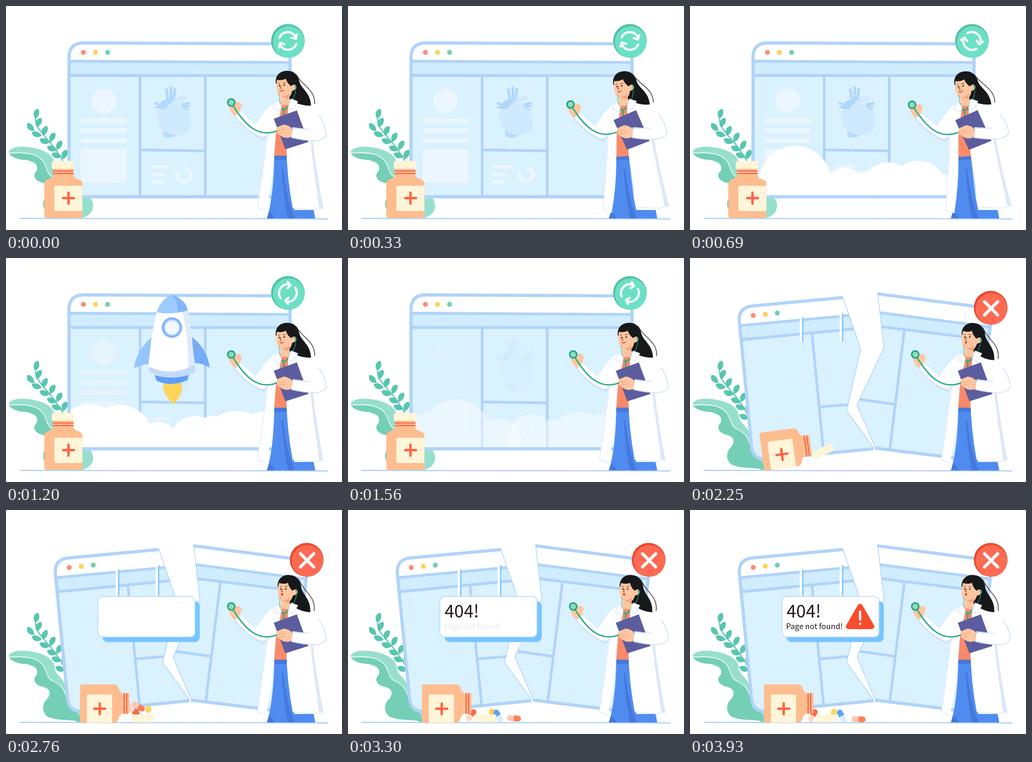
An HTML page for the animation above (4500 ms loop, 640 by 425 pixels).

```html
<!DOCTYPE html>
<html lang="en">
<head>
<meta charset="utf-8">
<title>Page not found</title>
<style>
html, body { margin: 0; width: 100%; height: 100%; overflow: hidden; background: #fff; }
svg { display: block; width: 100vw; height: 100vh; }
text { font-family: "Noto Sans CJK SC", "Noto Sans CJK JP", "Noto Sans", sans-serif; fill: #241616; font-weight: 500; }
</style>
</head>
<body>
<svg viewBox="0 0 640 425" xmlns="http://www.w3.org/2000/svg">
<defs>
  <clipPath id="leftHalf"><path d="M60,30H310L320,68L345,171L307,285L351,360V420H60Z"/></clipPath>
  <clipPath id="rightHalf"><path d="M600,30H310L320,68L345,171L307,285L351,360V420H600Z"/></clipPath>
  <clipPath id="stageArea"><path d="M124,-20H560V359H124Z"/></clipPath>
  <clipPath id="windowShape"><rect x="120" y="70" width="421" height="292" rx="28"/></clipPath>
  <g id="browser">
    <g clip-path="url(#windowShape)">
      <path d="M120,70H541V362H120Z" fill="#fff"/>
      <path d="M120,132H541V362H120Z" fill="#daf1fe"/>
      <path d="M120,102L541,104.500V134H120Z" fill="#b0d3f9"/>
      <path d="M128,107.500L534,109.500Q539,110 539,115V125Q539,130 534,130L128,129Q122,129 122,124V113Q122,107.500 128,107.500Z" fill="#d0ecff"/>
      <path d="M120,132H541M255.500,132V362M379.500,132V362M255,273L379,275" stroke="#b0d3f9" stroke-width="5" fill="none"/>
    </g>
    <path d="M148,70L541,72V362H148Q120,362 120,334V98Q120,70 148,70Z" fill="none" stroke="#b0d3f9" stroke-width="6"/>
    <circle cx="147.500" cy="88" r="4.700" fill="#ff8a7a"/>
    <circle cx="170.500" cy="88" r="4.700" fill="#ffd257"/>
    <circle cx="193.500" cy="88" r="4.700" fill="#70d0b0"/>
  </g>
</defs>

<!-- plants -->
<g id="fern" fill="#58c6b0"><path d="M56,214C57,240 88,252 113,303" fill="none" stroke="#58c6b0" stroke-width="2.200"/></g>
<path d="M5,279C5,270 18,267 30,267C55,267 90,276 93,298C92,312 108,316 113,333C122,345 165,352 166,378C166,396 150,403 135,403L60,300Z" fill="#97dfcd"/>
<path d="M5,279C25,278 50,277 64,288C80,300 74,318 90,325C108,332 112,345 118,362C126,374 136,382 146,403C120,396 100,400 84,394C70,390 66,371 77,360C84,353 88,341 72,336C56,333 48,322 59,312C62,300 52,292 35,292C22,291 10,287 5,279Z" fill="#74cfb6"/>
<path d="M5,279C25,278 50,277 64,288C80,300 74,318 90,325C108,332 112,345 118,362" fill="none" stroke="#fff" stroke-width="1.300"/>

<!-- window -->
<g id="left"><g clip-path="url(#leftHalf)"><use href="#browser"/></g></g>
<g id="right"><g clip-path="url(#rightHalf)"><use href="#browser"/></g></g>

<g id="content" fill="#ebf6ff">
  <circle cx="186.500" cy="180" r="23.500"/>
  <rect x="142" y="213" width="88" height="9" rx="2"/>
  <rect x="142" y="232" width="88" height="9" rx="2"/>
  <rect x="142" y="251" width="88" height="9" rx="2"/>
  <rect x="142" y="271" width="88" height="64.500" rx="6"/>
  <rect x="274" y="302" width="39" height="6.500" rx="3"/>
  <rect x="274" y="317" width="28" height="6.500" rx="3"/>
  <rect x="274" y="331" width="27" height="6.500" rx="3"/>
  <path d="M341,307A13,13 0 1 1 328,313M350,313A13,13 0 0 1 352,321" fill="none" stroke="#ebf6ff" stroke-width="7.500"/>
  <g stroke="#b1d7fc" fill="none">
    <path d="M300,247L299,232H316L326,245Q312,253 300,247Z" fill="#b9dcfd" stroke="none"/>
    <path d="M291,195C290,183 300,174 325,176L323,184C310,184 306,190 306,198Z" fill="#b1d7fc" stroke="none"/>
    <path d="M309,180L305,157M314,178V153M319,178L322,156" stroke-width="5"/>
    <path d="M296,188L283,184M296,192L284,192M334,187L350,184M336,189L350,190M336,192L348,197" stroke-width="4"/>
    <path d="M314,200Q316,176 342,174" stroke="#cfe9fe" stroke-width="9"/>
  </g>
  <path d="M287,205C286,193 301,198 312,191C322,183 334,184 335,192C353,202 356,224 349,235C339,247 322,247 310,242C295,236 289,222 287,205Z" fill="#cfe9fe"/>
</g>

<!-- rocket -->
<g clip-path="url(#stageArea)">
  <g id="rocket">
    <path d="M300,238C296,256 309,264 318,278C330,267 338,254 334,237Z" fill="#ffd45a"/>
    <path d="M277,151C259,166 246,188 244,209Q257,202 273,201Z" fill="#94c4fc"/>
    <path d="M354,150C374,164 386,188 388,208Q374,200 359,199Z" fill="#76acf8"/>
    <path d="M283,222Q316,232 348,221L346,231Q316,246 287,233Z" fill="#5f9ffa"/>
    <path d="M316,69C334,76 346,90 347,108C352,145 357,180 361,216C340,229 294,231 271,214C273,180 279,135 287,103C291,88 302,75 316,69Z" fill="#fff"/>
    <path d="M335,101L347,99C352,145 357,180 361,216L347,222Q349,150 335,101Z" fill="#deebfd"/>
    <path d="M272,206Q318,227 359,202L361,216C340,229 294,231 271,214Z" fill="#c4dafb"/>
    <path d="M316,69C334,76 344,87 346,99Q316,109 287,103C291,88 302,75 316,69Z" fill="#9dcbff"/>
    <path d="M316,69C334,76 344,87 346,99Q336,103 327,103Q329,85 316,69Z" fill="#82b6fb"/>
    <circle cx="316" cy="132" r="17" fill="#f4f9ff" stroke="#84b6fb" stroke-width="5"/>
    <circle cx="316" cy="132" r="13" fill="none" stroke="#d3e5fd" stroke-width="2"/>
  </g>
  <g id="cloudLeft" fill="#fff"></g>
  <g id="cloudRight" fill="#fff"></g>
</g>

<!-- status badge -->
<g id="badge">
  <g><circle r="32" fill="#51c0a7"/><circle cx="1.500" cy="2" r="30" fill="#6ce0c5"/></g>
  <g id="alarm"><circle r="32" fill="#ee472c"/><circle cx="1.500" cy="2" r="30" fill="#ff6a52"/></g>
  <g id="arrows" fill="none" stroke="#fff" stroke-width="4.200" stroke-linecap="round" stroke-linejoin="round">
    <path id="arrow" d="M-16,-6A17,17 0 0 1 14,-9M7,-6L15,-4L17,-12"/>
    <use href="#arrow" transform="rotate(180)"/>
  </g>
  <path id="cross" d="M-12.500,-12.500L12.500,12.500M12.500,-12.500L-12.500,12.500" stroke="#fff" stroke-width="6" stroke-linecap="round"/>
</g>

<path d="M26,403L614,404" stroke="#a8cdf5" stroke-width="2"/>

<!-- pills, bottle and lid -->
<g id="pills"></g>
<g id="bottle">
  <path d="M90,308H128V320Q129,325 135,328Q145,330 145.500,336V402H77Q73,402 73,398V336Q74,330 82,328Q89,325 90,320Z" fill="#febd8f"/>
  <path d="M89,313H129M89,318H129" stroke="#ff6142" stroke-width="2.200"/>
  <path d="M95,341H145.500V389H95Q92,389 92,386V344Q92,341 95,341Z" fill="#fff5d9"/>
  <path d="M109,364.500H129.500M119,354V375" stroke="#ff6142" stroke-width="4.500" stroke-linecap="round"/>
</g>
<path id="lid" d="M-18,-7.500H18Q21,-7.500 21,-4L21.500,4Q21.500,7.500 18,7.500H-18Q-21.500,7.500 -21.500,4L-21,-4Q-21,-7.500 -18,-7.500Z" fill="#fff5d9"/>

<!-- doctor -->
<path d="M511,284H537Q538,340 549,387H586L589,403H497Q510,360 511,284Z" fill="#508cf0"/>
<path d="M525,308Q528,360 537,403H550Q534,365 528,308ZM497,403L501,390Q510,396 511,403ZM511,284H537V292H511Z" fill="#4578dc"/>
<g id="body">
  <path d="M574,256L584,253Q592,320 605,386L596,382Q590,320 574,256Z" fill="#dce8f7"/>
  <path d="M519,182H541L538,284H511Z" fill="#f98a69"/>
  <path d="M538,180Q575,183 588,203Q607,220 580,258Q588,325 596,385L587,387L546,383Q535,325 534,265Z" fill="#fff"/>
  <path d="M546,383L587,387L600,384" fill="none" stroke="#cfe0f7" stroke-width="1.200"/>
  <path d="M517,179L500,196Q495,225 496,252Q487,325 479,383L495,389Q511,325 512,250L524,195Z" fill="#fff"/>
  <path d="M498,247Q487,325 479,383L495,389" fill="none" stroke="#e1ecf9" stroke-width="1.500"/>
  <g id="arm">
    <path d="M435,210Q462,244 491,253Q499,249 502,234Z" fill="#dbe7fa" stroke="#bfd5f5"/>
    <path d="M515,182Q501,189 491,203L475,225L448,201Q440,201 437,210Q463,240 487,248Q500,248 507,229Z" fill="#fff"/>
    <path d="M424,190Q430,186 435,184Q444,179 449,187Q448,195 444,201L436,209Q427,202 424,190Z" fill="#ffc6a1"/>
    <path d="M432,188C454,224 479,251 516,237" fill="none" stroke="#23ad80" stroke-width="2.500"/>
    <circle cx="429" cy="183" r="6.700" fill="#8bdcc0" stroke="#20a47c" stroke-width="2.800"/>
  </g>
  <g id="head">
    <path d="M514,147C512,131 523,122 537,123C549,123 557,132 559,144C563,158 580,164 581,189C562,190 548,182 539,176Z" fill="#171819"/>
    <path d="M553,130C563,151 589,157 588,186" fill="none" stroke="#4b3434" stroke-width="1.400"/>
    <path d="M516,140Q526,142 533,138Q536,147 543,152Q550,146 553,152Q552,160 545,161Q543,170 540,172V188H523V172Q517,170 516,159Q514,152 516,140Z" fill="#ffc6a1"/>
    <path d="M525,171Q534,172 540,165L539,175Q532,176 525,171Z" fill="#f2a681"/>
    <circle cx="521" cy="151" r="1.400" fill="#201715"/><circle cx="530" cy="150" r="1.400" fill="#201715"/>
    <path d="M518,147L522,146M527,146L533,145M524,151L522,156H525" fill="none" stroke="#663d30"/>
    <path id="smile" d="M521,160Q525,163 529,159" fill="none" stroke="#c53d31" stroke-width="1.400"/>
    <ellipse id="gasp" cx="524" cy="161" rx="1.900" ry="2.500" fill="#c53d31"/>
    <path d="M549,152Q554,151 552,157" fill="none" stroke="#24ad81" stroke-width="2"/>
    <path d="M551,154Q553,173 540,184M521,167V184" fill="none" stroke="#35b68f" stroke-width="1.500" stroke-dasharray="2 1"/>
  </g>
  <path d="M541,184Q538,193 529,197Q523,194 521,183M529,196V208" fill="none" stroke="#24ad81" stroke-width="2.500"/>
  <path d="M518,178L509,193L522,199L525,191ZM543,176L556,181L547,197L537,192Z" fill="#fff" stroke="#c8dcf5"/>
  <path d="M510,214L554,198L576,258L532,272Z" fill="#5c5d9f"/>
  <path d="M546,230L579,234L595,210Q607,224 610,242Q609,252 594,255Q569,257 543,250Z" fill="#fff"/>
  <path d="M543,249Q575,257 594,255Q610,252 610,242Q607,223 596,208M546,232L579,234" fill="none" stroke="#cbdff7" stroke-width="1.500"/>
  <path d="M516,230L529,225Q536,225 545,232L544,248Q533,253 524,247L516,241Z" fill="#ffc6a1"/>
  <path d="M517,236L531,235M519,241L531,240" stroke="#ef9f7a"/>
</g>

<!-- hanging notice -->
<g id="rods"></g>
<g id="sign">
  <rect x="184" y="173" width="185" height="77.500" rx="9" fill="#76c5ff"/>
  <rect x="175" y="164" width="185" height="77" rx="9" fill="#fff" stroke="#b3daff" stroke-width="1.500"/>
</g>
<text id="code" x="184" y="203.500" font-size="33">404!</text>
<text id="message" x="183" y="226" font-size="14.700">Page not found!</text>
<g id="warning">
  <path d="M324,183L346,221H302Z" fill="#fa4b2d" stroke="#fa4b2d" stroke-width="10" stroke-linejoin="round"/>
  <path d="M324,193V208M324,216V216.100" stroke="#fff" stroke-width="4.500" stroke-linecap="round"/>
</g>
</svg>
<script>
const LOOP = 4500;
const $ = id => document.getElementById(id);
const lerp = (a, b, k) => a + (b - a) * k;
const clamp01 = k => Math.min(1, Math.max(0, k));
const smooth = k => k * k * (3 - 2 * k);
const cubic = k => k < .5 ? 4 * k ** 3 : 1 - 4 * (1 - k) ** 3;
const span = (t, from, to) => clamp01((t - from) / (to - from));

// Interpolates [time, ...values] keys
function track(t, keys, ease = k => k) {
  let i = 0;
  while (i < keys.length - 2 && t > keys[i + 1][0]) i++;
  const [a, b] = [keys[i], keys[i + 1]];
  const k = ease(span(t, a[0], b[0]));
  return a.slice(1).map((v, j) => lerp(v, b[j + 1], k));
}

function add(parent, name, attrs) {
  const el = document.createElementNS("http://www.w3.org/2000/svg", name);
  for (const key in attrs) el.setAttribute(key, attrs[key]);
  return parent.appendChild(el);
}
const move = (el, value) => el.setAttribute("transform", value);
const turn = (id, angle, x, y) => move($(id), `rotate(${angle} ${x} ${y})`);
const grow = (id, scale, x, y) => move($(id), `translate(${x} ${y}) scale(${scale}) translate(${-x} ${-y})`);
const fade = (id, opacity) => $(id).setAttribute("opacity", opacity);

// Fern leaves: base on the stem, then angle
[[56, 214, 12], [58, 230, 25], [54, 237, -45], [70, 246, 22], [68, 246, -75], [84, 258, 25],
 [83, 259, -75], [97, 273, 25], [97, 273, -75], [108, 291, 20], [106, 286, -75], [113, 304, -75]]
  .forEach(([x, y, a]) => add($("fern"), "path", {
    d: "M0,0C-8,-7 -7,-16 1,-20C7,-15 6,-6 0,0Z", transform: `translate(${x} ${y}) rotate(${a})`
  }));

const cracks = ["left", "right"].map(id => add($(id), "path", {
  d: "M320,68L345,171L307,285L351,360", fill: "none", stroke: "#a7cef8", "stroke-width": 1.2
}));

// Cloud puffs: [x, y, radius] rising, billowing, settling
const puffs = [
  ["cloudLeft", [165, 345, 36], [158, 340, 63], [150, 340, 45]],
  ["cloudLeft", [200, 332, 69], [217, 343, 64], [207, 332, 64]],
  ["cloudLeft", [295, 350, 45], [290, 352, 41], [285, 350, 45]],
  ["cloudRight", [350, 350, 42], [360, 347, 47], [350, 340, 44]],
  ["cloudRight", [378, 342, 48], [395, 350, 50], [390, 350, 42]],
  ["cloudRight", [435, 346, 55], [440, 360, 70], [440, 355, 63]],
  ["cloudRight", [480, 362, 45], [500, 365, 75], [490, 350, 55]]
].map(([id, a, b, c]) => ({
  el: add($(id), "circle", {}),
  keys: [[690, ...a], [1200, ...b], [1560, ...c]]
}));

// Pills: two colours, half length, then x, y, angle when spilling and at rest
const pills = [
  ["#ffd45a", "#ffd45a", 7, [271, 378, 80], [274, 384, 100]],
  ["#5ba4f6", "#d9ebff", 13, [250, 385, 40], [289, 391, 62]],
  ["#ffc9b0", "#fb7f5c", 13.5, [252, 373, 30], [321, 397, 2]],
  ["#fb6a48", "#ffd9c8", 13, [243, 381, -140], [234, 390, -240]]
].map(([first, second, half, spill, rest]) => {
  const el = add($("pills"), "g", {});
  const r = 5.5, w = half - r;
  add(el, "path", { d: `M0,${-r}H${-w}A${r},${r} 0 0 0 ${-w},${r}H0Z`, fill: first });
  add(el, "path", { d: `M0,${-r}H${w}A${r},${r} 0 0 1 ${w},${r}H0Z`, fill: second });
  return { el, keys: [[2640, 222, 372, 0], [2760, ...spill], [3500, ...rest]] };
});

const rods = [[209, 113], [285, 105]].map(([x, y]) => ({
  y,
  parts: [["#79c5ff", x + 2.5], ["#fff", x]].map(([fill, left]) =>
    add($("rods"), "rect", { x: left, y, width: 4.5, fill }))
}));

const bottleAngle = t => track(t, [[1680, 0], [1800, 8], [2160, 68], [2250, 82.5], [2295, 90]])[0];

function drawBottle(t) {
  turn("bottle", bottleAngle(t), 142.5, 400.5);
  const release = 2130;
  const angle = bottleAngle(Math.min(t, release));
  const a = angle * Math.PI / 180, dx = -34, dy = -99;
  const held = [142.5 + dx * Math.cos(a) - dy * Math.sin(a), 400.5 + dx * Math.sin(a) + dy * Math.cos(a), angle];
  const [x, y, spin] = track(t, [[release, ...held], [2250, 253, 367, 153], [2370, 261, 395.5, 180]]);
  move($("lid"), `translate(${x} ${y}) rotate(${spin})`);
  fade("pills", t >= 2640 ? 1 : 0);
  for (const { el, keys } of pills) {
    const [px, py, pa] = track(t, keys, k => 1 - (1 - k) ** 2);
    move(el, `translate(${px} ${py}) rotate(${pa})`);
  }
}

function drawLaunch(t) {
  fade("content", track(t, [[1080, 1], [1200, .75], [1620, .1], [1680, 0]])[0]);
  const [lift] = track(t, [[800, 300], [1200, 0], [1480, -300]]);
  move($("rocket"), `translate(0 ${lift})`);
  const rise = 105 * (1 - span(t, 520, 700)) ** 1.3;
  for (const { el, keys } of puffs) {
    const [x, y, r] = track(t, keys, smooth);
    el.setAttribute("cx", x);
    el.setAttribute("cy", y + rise);
    el.setAttribute("r", r);
  }
  const haze = 1 - span(t, 1480, 1630);
  fade("cloudLeft", haze);
  fade("cloudRight", haze);
}

function drawBreak(t) {
  const k = smooth(span(t, 1640, 2130));
  turn("left", -5.6 * k, 349, 375);
  turn("right", 7 * k, 363, 371);
  cracks.forEach(el => el.setAttribute("opacity", clamp01(k * 5)));
  move($("badge"), `translate(${lerp(537, 572.7, k)} ${lerp(66.3, 94.5, k)})`);
  move($("arrows"), `rotate(${135 * cubic(span(t, 0, 1650))})`);
  const alarm = span(t, 1720, 1950);
  fade("alarm", alarm);
  fade("arrows", 1 - alarm);
  move($("cross"), `translate(.8 1) scale(${track(t, [[1980, 0], [2160, 1.08], [2250, 1]], smooth)[0]})`);
}

function drawDoctor(t) {
  const swing = t < 1110 ? Math.sin(Math.PI * t / 1110) : 0;
  turn("body", -4.7 * swing, 545, 280);
  turn("arm", 3.5 * swing, 510, 205);
  turn("head", 6 * smooth(span(t, 1650, 2130)), 533, 178);
  const shocked = t >= 1800 ? 1 : 0;
  fade("gasp", shocked);
  fade("smile", 1 - shocked);
}

function drawNotice(t) {
  const drop = span(t, 2130, 2262);
  for (const { y, parts } of rods)
    parts.forEach(el => el.setAttribute("height", (164 - y) * drop));
  grow("sign", track(t, [[2230, 0], [2760, 1], [2880, 1.04], [3030, 1]])[0], 267, 186);
  fade("code", span(t, 3100, 3300));
  fade("message", span(t, 3280, 3480));
  grow("warning", track(t, [[3500, 0], [3700, 1.12], [3810, 1.03], [3930, 1]], smooth)[0], 324, 204);
}

function render(now) {
  const t = now % LOOP;
  drawLaunch(t);
  drawBreak(t);
  drawBottle(t);
  drawDoctor(t);
  drawNotice(t);
}

let start;
function tick(now) {
  start ??= now;
  render(now - start);
  requestAnimationFrame(tick);
}
render(0);
requestAnimationFrame(tick);
</script>
</body>
</html>
```
